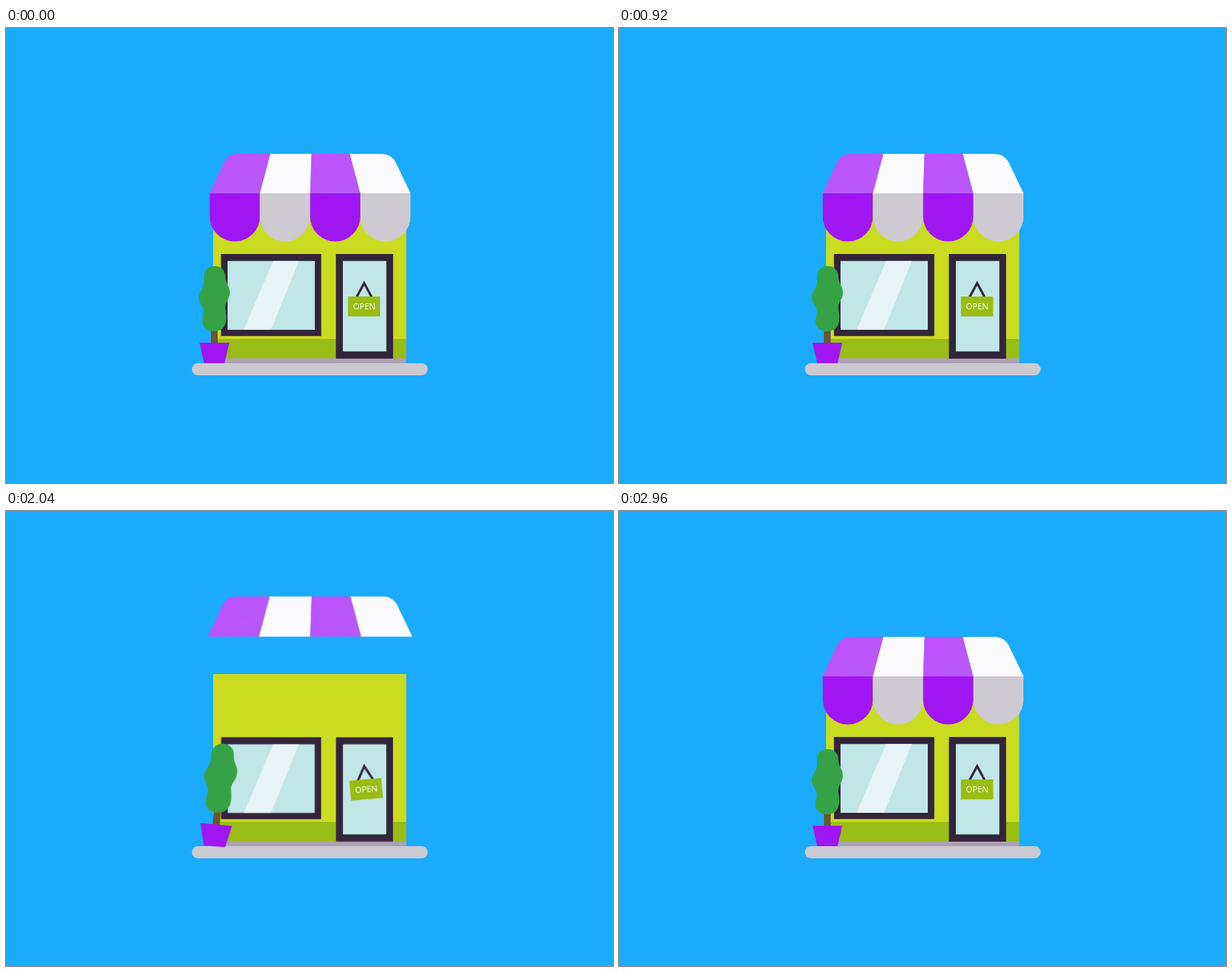
Write an HTML page that moves like this. It is 800 px wide and 600 px high and loops after 3 s.

```html
<!DOCTYPE html>
<html lang="en">
<head>
<meta charset="utf-8">
<title>Shop</title>
<style>
  html, body { margin: 0; width: 100%; height: 100%; overflow: hidden; background: #1babfd; }
  svg { display: block; width: 100vw; height: 100vh; }
  text { font: 11px "Open Sans", "Noto Sans", sans-serif; fill: #fff; text-anchor: middle; }
  .dark { fill: #33253b; }
  .glass { fill: #c0e6e8; }
  .lime { fill: #99bd14; }
</style>
</head>
<body>
<svg viewBox="0 0 800 600">
  <defs>
    <linearGradient id="violet" x1="0" y1="0" x2="1" y2="1">
      <stop offset="0" stop-color="#c150ff"/>
      <stop offset="1" stop-color="#b65af8"/>
    </linearGradient>
  </defs>
  <rect id="walk" x="245" y="442" width="310.7" height="16" rx="8" fill="#cacad0"/>
  <rect id="plinth" x="272.5" y="435" width="255" height="7" fill="#ada0b5"/>
  <rect id="base" class="lime" x="272.5" y="410" width="255" height="25.5"/>
  <rect id="wall" x="273" y="215" width="254.5" height="195" fill="#cadb20"/>
  <g id="pane">
    <path class="dark" d="M283.3 298H415.5V406.3H283.3Z"/>
    <path class="glass" d="M292 307.3H407V398H292Z"/>
    <path fill="#e6f3f8" d="M352 307.3H386L349.3 398H313.3Z"/>
  </g>
  <g id="door">
    <path class="dark" d="M434.8 298H510.2V436H434.8Z"/>
    <path class="glass" d="M444 307.3H501.3V426.5H444Z"/>
  </g>
  <g id="sign">
    <path d="M462 355L472 336.5L482 355" fill="none" stroke="#33253b" stroke-width="3"/>
    <path class="lime" d="M450.7 354H493V380.3H450.7Z"/>
    <text x="472" y="371">OPEN</text>
  </g>
  <g id="flaps"></g>
  <g id="awning">
    <path fill="url(#violet)" d="M268.5 218L286.5 179Q292 166 305 166H348.5L334.7 218Z"/>
    <path fill="#fbfbfe" d="M334.7 218L348.5 166H402.7L400.9 218Z"/>
    <path fill="url(#violet)" d="M400.9 218L402.7 166H453.2L467 218Z"/>
    <path fill="#fbfbfe" d="M467 218L453.2 166H495Q508 166 514 178L533.2 218Z"/>
  </g>
  <g id="plant">
    <path fill="#6a5536" d="M270 396H279V416H270Z"/>
    <path fill="#35a345" d="M275 314C284 314 289 320 289 328C289 337 295 339 295 349C295 358 288 362 289 370C290 376 291 380 290 386C289 395 283 400 274 400C265 400 259 395 259 387C259 380 262 376 260 370C258 364 254 362 254 355C254 348 261 343 261 335V328C261 320 266 314 275 314Z"/>
    <path fill="#a016f2" d="M255 415H294.3L288 442H261.3Z"/>
  </g>
</svg>
<script>
const LOOP = 3000, CUT = 1000;
const OUT = 'cubic-bezier(.5,1,.89,1)';
const IN = 'cubic-bezier(.11,0,.5,0)';
const SOFT = 'cubic-bezier(.45,0,.55,1)';
const $ = id => document.getElementById(id);

const pose = ({ s = 1, sx = s, sy = s, x = 0, y = 0, r = 0 }) =>
  `translate(${x}px,${y}px) rotate(${r}deg) scale(${sx},${sy})`;

// steps: [ms, pose, easing to the next step]; the part is at rest until the cut
function move(el, origin, steps) {
  const first = steps[0];
  const all = [[0, {}], [CUT, {}], [CUT, first[1]], ...steps, [LOOP, {}]];
  el.style.transformOrigin = origin;
  el.animate(all.map(([ms, p, easing = 'linear']) =>
    ({ offset: ms / LOOP, transform: pose(p), easing })),
    { duration: LOOP, iterations: Infinity });
}

move($('walk'), '400.3px 450px', [
  [1000, { sx: 0 }, OUT], [1400, { sx: 1.007 }], [1480, { sx: 1.007 }, SOFT], [1840, {}]]);
move($('plinth'), '400px 442px', [[1160, { s: 0 }, OUT], [1340, {}]]);
move($('base'), '400px 435.5px', [[1240, { s: 0 }, OUT], [1420, {}]]);
move($('wall'), '400px 410px', [
  [1400, { s: 0 }, OUT], [1640, { s: 1.02 }, SOFT], [1780, {}]]);

const pop = [[1600, { s: 0 }, OUT], [1800, { s: 1.103 }, SOFT], [1960, { s: .985 }, SOFT], [2080, {}]];
move($('pane'), '349.4px 406.3px', pop);
move($('door'), '472.5px 436px', pop);

move($('sign'), '472px 335px', [
  [1700, { s: 0 }],
  [1800, { s: .67 }, OUT],
  [1900, { s: 1.1, r: 3 }, SOFT],
  [2040, { s: 1, r: -5 }, SOFT],
  [2180, { s: 1, r: -2 }, SOFT],
  [2320, { s: 1.02, r: 2 }, SOFT],
  [2480, { r: -.8 }, SOFT],
  [2600, {}]]);

move($('awning'), '401px 218px', [
  [1740, { s: 0, y: 25, r: -14 }],
  [1800, { s: .33, x: 1, y: 8, r: -11.2 }, OUT],
  [1950, { s: 1.03, y: -91, r: 0 }, IN],
  [2090, {}]]);

move($('plant'), '274.5px 442px', [
  [1740, { s: 0, r: -90 }],
  [1800, { s: .255, x: 3.5, y: -2, r: -74 }],
  [1900, { s: .63, x: 1, r: -38 }, OUT],
  [2040, { s: 1.06, r: 5 }, SOFT],
  [2180, { s: .98, r: -2 }, SOFT],
  [2320, { s: .99, r: -.4 }, SOFT],
  [2440, {}]]);

[2090, 2078, 2120, 2181].forEach((start, i) => {
  const flap = document.createElementNS('http://www.w3.org/2000/svg', 'path');
  const left = 268.5 + i * 66.15;
  flap.setAttribute('d', `M${left} 217.5h66.15v31a33.07 33 0 0 1 -66.15 0Z`);
  flap.setAttribute('fill', i % 2 ? '#cdcad1' : '#a016f2');
  $('flaps').append(flap);
  move(flap, '401px 217.5px', [
    [start, { sy: 0 }, OUT],
    [start + 200, { sy: 1.17 }, SOFT],
    [start + 360, { sy: .95 }, SOFT],
    [start + 480, {}]]);
});
</script>
</body>
</html>
```
